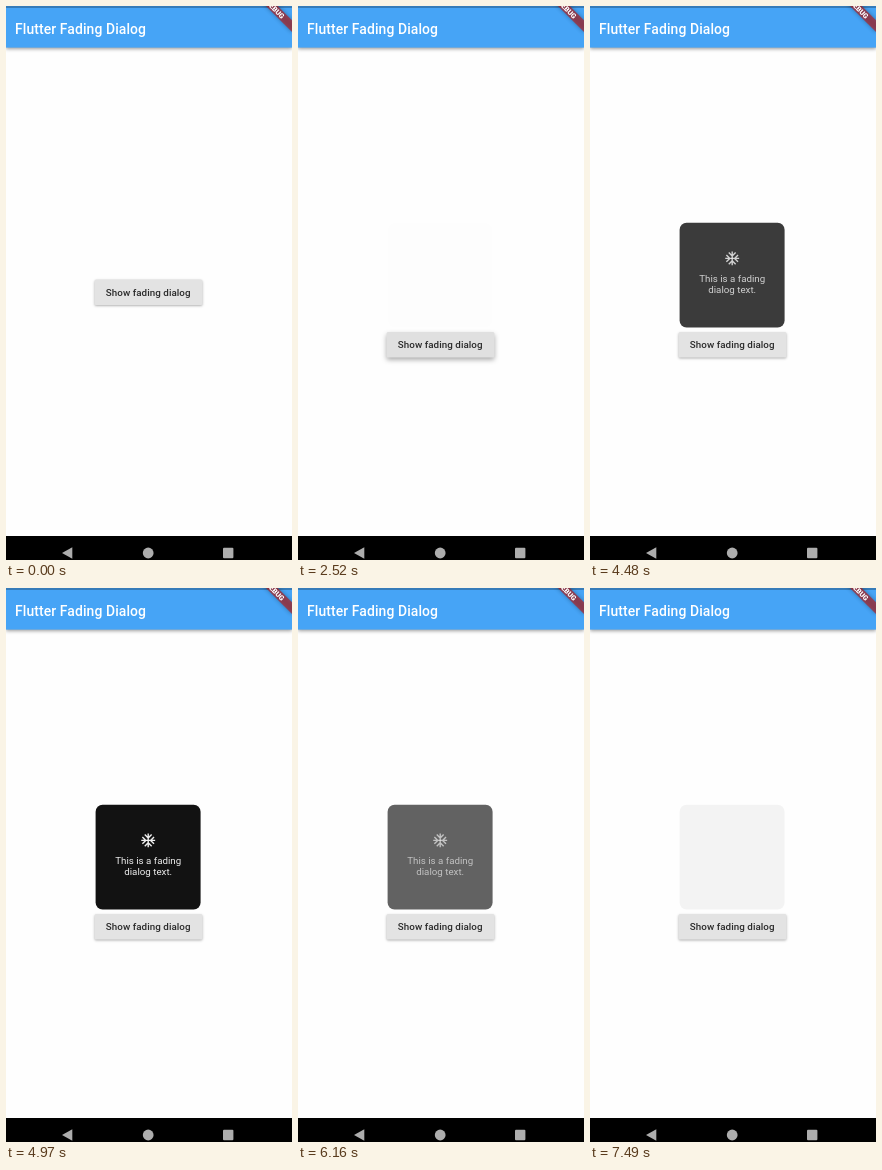
These frames come from a looping animation (286 px wide and 554 px high, 7.98 s). An HTML page with a canvas:

```html
<!DOCTYPE html>
<html lang="en">
<head>
<meta charset="utf-8">
<title>Flutter Fading Dialog</title>
<style>
html, body { margin: 0; width: 100%; height: 100%; overflow: hidden; background: #fefefe; }
canvas { display: block; width: 286px; height: 554px; }
</style>
</head>
<body>
<canvas id="stage"></canvas>
<script>
const W = 286, H = 554;
const LOOP = 7980, STEP = 70, LAST_STEP = 7490;
const PRESS = 2240, SHOW = 2450, SETTLE = 2730;

// Dialog opacity: time (ms), value, slope (per second)
const FADE = [
  [2400, 0, 0],
  [3570, 0.33, 0.47],
  [4480, 0.77, 0.42],
  [5170, 0.95, 0],
  [5600, 0.895, -0.33],
  [6510, 0.41, -0.52],
  [7490, 0.043, -0.17]
];

const canvas = document.getElementById('stage');
const ctx = canvas.getContext('2d');
const ratio = window.devicePixelRatio || 1;
canvas.width = W * ratio;
canvas.height = H * ratio;

const clamp = v => Math.max(0, Math.min(1, v));

function hermite(keys, t) {
  if (t <= keys[0][0]) return keys[0][1];
  for (let i = 1; i < keys.length; i++) {
    const [t0, v0, m0] = keys[i - 1];
    const [t1, v1, m1] = keys[i];
    if (t > t1) continue;
    const span = (t1 - t0) / 1000;
    const u = (t - t0) / (t1 - t0);
    const w = 1 - u;
    return v0 * (1 + 2 * u) * w * w + m0 * span * u * w * w
         + v1 * u * u * (3 - 2 * u) - m1 * span * u * u * w;
  }
  return keys[keys.length - 1][1];
}

function rect(x, y, w, h, color) {
  ctx.fillStyle = color;
  ctx.fillRect(x, y, w, h);
}

function roundRect(x, y, w, h, r, color) {
  ctx.fillStyle = color;
  ctx.beginPath();
  ctx.roundRect(x, y, w, h, r);
  ctx.fill();
}

function text(str, x, y, size, weight, color, align = 'center', spacing = 0) {
  ctx.font = `${weight} ${size}px Roboto, sans-serif`;
  ctx.letterSpacing = spacing + 'px';
  ctx.textAlign = align;
  ctx.fillStyle = color;
  ctx.fillText(str, x, y);
}

function withShadow(alpha, blur, dy, draw) {
  ctx.save();
  ctx.shadowColor = `rgba(0,0,0,${alpha})`;
  ctx.shadowBlur = blur * ratio;
  ctx.shadowOffsetY = dy * ratio;
  draw();
  ctx.restore();
}

function drawAppBar() {
  withShadow(0.38, 3.5, 1.2, () => rect(0, 0, W, 41.6, '#46a4f6'));
  rect(0, 0, W, 2, 'rgba(0,0,0,.25)');
  text('Flutter Fading Dialog', 9, 27.6, 13.92, 500, '#fff', 'left', 0.1);
}

function drawRibbon() {
  ctx.save();
  ctx.translate(W, -13.3);
  ctx.rotate(Math.PI / 4);
  withShadow(0.5, 4, 0, () => rect(-27.8, 19.5, 55.7, 8.35, 'rgba(183,28,28,.65)'));
  text('DEBUG', 0, 26.2, 7.1, 900, '#fff');
  ctx.restore();
}

function drawButton(y, lift) {
  const color = lift > 0 ? '#e0e0e0' : '#e3e3e3';
  withShadow(0.3 + 0.04 * lift, 2.5 + 3 * lift, 1 + 1.4 * lift,
    () => roundRect(88.6, y, 107.8, 25.3, 1.5, color));
  text('Show fading dialog', 142.2, y + 16.1, 9.8, 500, '#2b2b2b', 'center', 0.05);
}

function drawSnowflake(x, y) {
  ctx.save();
  ctx.translate(x, y);
  ctx.scale(0.696, 0.696);
  ctx.strokeStyle = '#fff';
  ctx.lineWidth = 2;
  for (let arm = 0; arm < 4; arm++) {
    ctx.beginPath();
    ctx.moveTo(0, 0);
    ctx.lineTo(0, -10);
    ctx.moveTo(-4.95, -8.36);
    ctx.lineTo(0, -3.41);
    ctx.lineTo(4.95, -8.36);
    ctx.stroke();
    ctx.rotate(Math.PI / 2);
  }
  ctx.restore();
}

function drawDialog(opacity) {
  ctx.save();
  roundRect(89.6, 216.7, 105, 104.8, 7, `rgba(0,0,0,${opacity})`);
  ctx.globalAlpha = opacity;
  drawSnowflake(142.2, 252.4);
  text('This is a fading', 142.2, 275.5, 9.74, 400, '#fff');
  text('dialog text.', 142.2, 286.7, 9.74, 400, '#fff');
  ctx.restore();
}

function drawNavBar() {
  rect(0, 530, W, 24, '#000');
  ctx.fillStyle = '#adadad';
  ctx.beginPath();
  ctx.moveTo(56, 547);
  ctx.lineTo(66.3, 541.3);
  ctx.lineTo(66.3, 552.7);
  ctx.fill();
  ctx.beginPath();
  ctx.arc(142.2, 547, 5.4, 0, Math.PI * 2);
  ctx.fill();
  roundRect(217, 541.8, 10.4, 10.4, 1, '#adadad');
}

function render(time) {
  const t = Math.min(Math.floor(time / STEP) * STEP, LAST_STEP);
  const shown = t >= SHOW;
  const lift = shown ? clamp((SETTLE - t) / 210) : clamp((t - PRESS) / 140);
  ctx.setTransform(ratio, 0, 0, ratio, 0, 0);
  rect(0, 0, W, H, '#fefefe');
  drawAppBar();
  drawRibbon();
  if (shown) drawDialog(hermite(FADE, t));
  drawButton(shown ? 326.1 : 273.6, lift);
  drawNavBar();
}

const start = performance.now();
function tick() {
  render((performance.now() - start) % LOOP);
  requestAnimationFrame(tick);
}
tick();
</script>
</body>
</html>
```
